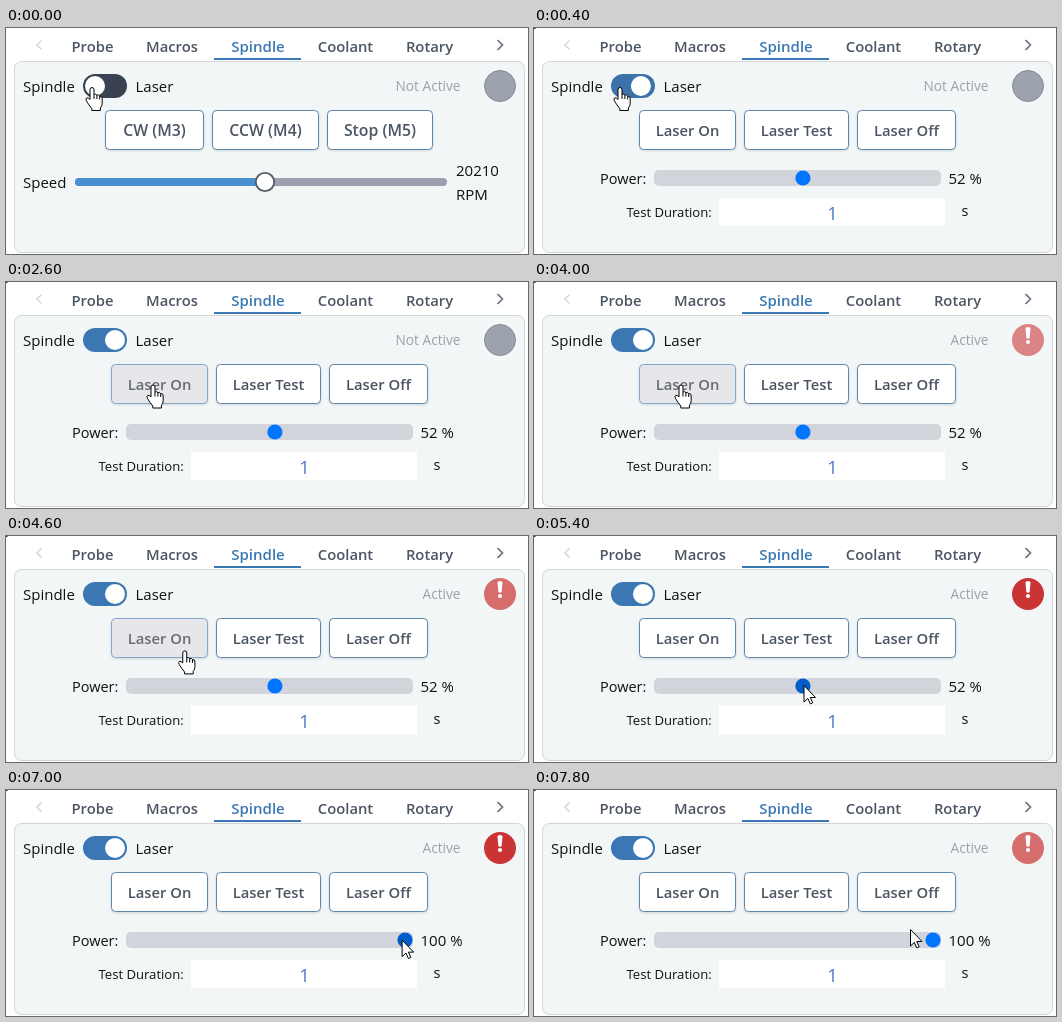
These frames come from a looping animation (522x226 px, 8000 ms). An HTML page:

```html
<!DOCTYPE html>
<html lang="en">
<head>
<meta charset="utf-8">
<title>Spindle and laser panel</title>
<style>
  html, body { margin: 0; width: 100%; height: 100%; overflow: hidden; background: #fff; }
  svg { display: block; width: 100vw; height: 100vh; font: 15px "Open Sans", "Noto Sans", sans-serif; fill: #111; }
  .tab, .button text { font-weight: 600; font-size: 14.8px; fill: #4b5563; text-anchor: middle; }
  .tab.current { fill: #3b78b3; font-size: 15px; }
  #spindle .button text { font-size: 15.8px; }
  .button rect { fill: #fff; stroke: #5e87ac; filter: drop-shadow(0 1px 1px #0002); }
  .button.hover rect { fill: #e6e6eb; stroke: #86a8c8; }
  .button.hover text { fill: #666c76; }
  .chevron { fill: none; stroke-width: 1.7; }
  #status { font-size: 13.7px; fill: #9ca0ac; text-anchor: end; }
  #hand, #arrow { fill: #fff; stroke: #000; stroke-linejoin: round; }
</style>
</head>
<body>
<svg viewBox="0 0 522 226">
  <rect x="8.5" y="33.5" width="510" height="191" rx="7" fill="#f3f6f7" stroke="#d2d5d8"/>
  <rect x="208" y="30" width="87" height="2" fill="#3b78b3"/>
  <g id="tabs"></g>
  <path class="chevron" d="M35.5 12.5l-4.5 4.5 4.5 4.5" stroke="#d6d9dd"/>
  <path class="chevron" d="M491.500 12l5 5-5 5" stroke="#6b7280"/>
  <rect id="corner" width="1.5" height="1" fill="#222"/>

  <text x="17" y="64">Spindle</text>
  <rect id="track" x="77" y="46" width="44" height="24" rx="12"/>
  <circle id="knob" cy="58" r="10" fill="#fff"/>
  <text x="129.5" y="64">Laser</text>
  <text id="status" x="454.5" y="63"></text>
  <circle id="idle" cx="494" cy="58" r="15.5" fill="#9ca3af" stroke="#858b96"/>
  <g id="alert">
    <circle cx="494" cy="58" r="16" fill="#c92a2a"/>
    <path d="M491.5 46.500q0-1.500 2.500-1.500t2.500 1.500l-.8 9q-.2 1.200-1.700 1.200t-1.700-1.200z" fill="#fff"/>
    <circle cx="494" cy="60" r="2.100" fill="#fff"/>
  </g>

  <g id="spindle">
    <text x="17" y="160">Speed</text>
    <rect x="69" y="150" width="372" height="8" rx="4" fill="#9d9fae"/>
    <rect x="69" y="150" width="190" height="8" rx="4" fill="#4a8fd1"/>
    <circle cx="259" cy="154" r="9.200" fill="#fff" stroke="#555b63" stroke-width="1.800"/>
    <text x="450" y="148">20210</text>
    <text x="450" y="172">RPM</text>
  </g>

  <g id="laser">
    <text x="66" y="156" font-size="14.5">Power:</text>
    <rect x="120" y="142" width="287" height="16" rx="5" fill="#d1d5db"/>
    <circle id="thumb" cy="150" r="7.600"/>
    <text id="percent" x="414.5" y="156"></text>
    <text x="92.500" y="189" font-size="13.1">Test Duration:</text>
    <rect x="185" y="170" width="226" height="28" fill="#fff"/>
    <text x="298.5" y="192" font-size="18.5" fill="#4b78c0" text-anchor="middle">1</text>
    <text x="427.5" y="188" font-size="14.5">s</text>
  </g>

  <path id="hand" d="M-2 12V2a2 2 0 0 1 4 0v5q1.800-1 2.900.6 1.800-.8 2.800 1 2.500-.3 2.500 2.400v4.500q0 3-1.800 5v2.500h-8.600v-2q-3-3.500-5.200-7.300-1.300-2.300 0-3.200 1.600-.6 3.400 1.500zM2 7v4.500M4.900 7.600v4M7.700 8.600v3.400"/>
  <path id="arrow" d="M.5.500v16.500l3.800-3.600 2.500 5.500 2.400-1.100-2.400-5.300h5.200z"/>
</svg>
<script>
const LOOP = 8000, STEP = 200;
const LASER_AT = 200, ACTIVE_AT = 3200, PRESS_AT = 5600, RELEASE_AT = 6800;
const THUMB_LAG = 60;
const $ = id => document.getElementById(id);

const home = { x: 86, y: 59.5 };
const toLaserOn = { from: 1300, to: 2400, x: 147, y: 103 };
const toThumb = { from: 4200, to: 5400, x: 269.5, y: 149 };
const drag = { from: 5400, to: 6600, x: 400, y: 152, dip: 16 };
const away = { from: 6700, to: 7800, x: 376, y: 139 };

const smooth = k => k * k * (3 - 2 * k);
const progress = (t, { from, to }) => smooth(Math.min(1, Math.max(0, (t - from) / (to - from))));
const lerp = (a, b, k) => a + (b - a) * k;
const mix = (a, b, k) => `rgb(${a.map((v, i) => Math.round(lerp(v, b[i], k)))})`;
const inside = (x, y, [left, top, right, bottom]) => x >= left && x <= right && y >= top && y <= bottom;
const show = (id, on) => $(id).style.display = on ? "" : "none";

function pointerAt(t) {
  return [toLaserOn, toThumb, drag, away].reduce((p, move) => {
    const k = progress(t, move);
    return {
      x: lerp(p.x, move.x, k),
      y: lerp(p.y, move.y, k) + (move.dip || 0) * Math.sin(Math.PI * k)
    };
  }, home);
}

function addButton(group, label, left, right) {
  $(group).insertAdjacentHTML("beforeend",
    `<g class="button"><rect x="${left + 0.5}" y="82.5" width="${right - left - 1}" height="39" rx="4"/>
     <text x="${(left + right) / 2}" y="108">${label}</text></g>`);
  return $(group).lastElementChild;
}

[["Probe", 86.5], ["Macros", 166], ["Spindle", 252], ["Coolant", 339.5], ["Rotary", 423.5]].forEach(([label, x]) =>
  $("tabs").insertAdjacentHTML("beforeend",
    `<text class="tab ${label === "Spindle" ? "current" : ""}" x="${x}" y="24">${label}</text>`));

addButton("spindle", "CW (M3)", 99, 198);
addButton("spindle", "CCW (M4)", 206, 313);
addButton("spindle", "Stop (M5)", 321, 427);
const laserOn = addButton("laser", "Laser On", 105, 202);
addButton("laser", "Laser Test", 210, 315);
addButton("laser", "Laser Off", 323, 422);

function draw(t) {
  const laser = t >= LASER_AT, active = t >= ACTIVE_AT;
  const { x, y } = pointerAt(t);

  show("spindle", !laser);
  show("laser", laser);
  show("corner", laser);
  const on = progress(t, { from: 0, to: 500 });
  $("track").style.fill = mix([57, 66, 81], [59, 120, 179], on);
  $("knob").setAttribute("cx", lerp(89, 109, on));

  $("status").textContent = active ? "Active" : "Not Active";
  show("idle", !active);
  show("alert", active);
  const phase = Math.abs(t - ACTIVE_AT) / 1000 % 2;
  $("alert").style.opacity = 1 - 0.5 * smooth(phase < 1 ? phase : 2 - phase);

  const power = lerp(52, 100, progress(t - THUMB_LAG, drag));
  const thumbX = 128 + power * 2.71;
  const dragging = t >= PRESS_AT && t < RELEASE_AT;
  const overThumb = Math.hypot(x - thumbX, y - 150) < 8;
  $("thumb").setAttribute("cx", thumbX);
  $("thumb").style.fill = dragging ? "#3793ff" : overThumb ? "#005cc8" : "#0075ff";
  $("percent").textContent = `${Math.round(power)} %`;

  const overButton = inside(x, y, [105, 82, 202, 122]);
  const hand = overButton || inside(x, y, [77, 46, 121, 70]);
  laserOn.classList.toggle("hover", overButton);
  show("hand", hand);
  show("arrow", !hand);
  $(hand ? "hand" : "arrow").setAttribute("transform", `translate(${x} ${y})`);
}

const start = performance.now();
function tick() {
  const t = (performance.now() - start) % LOOP;
  draw(Math.floor(t / STEP) * STEP);
  requestAnimationFrame(tick);
}
tick();
</script>
</body>
</html>
```
